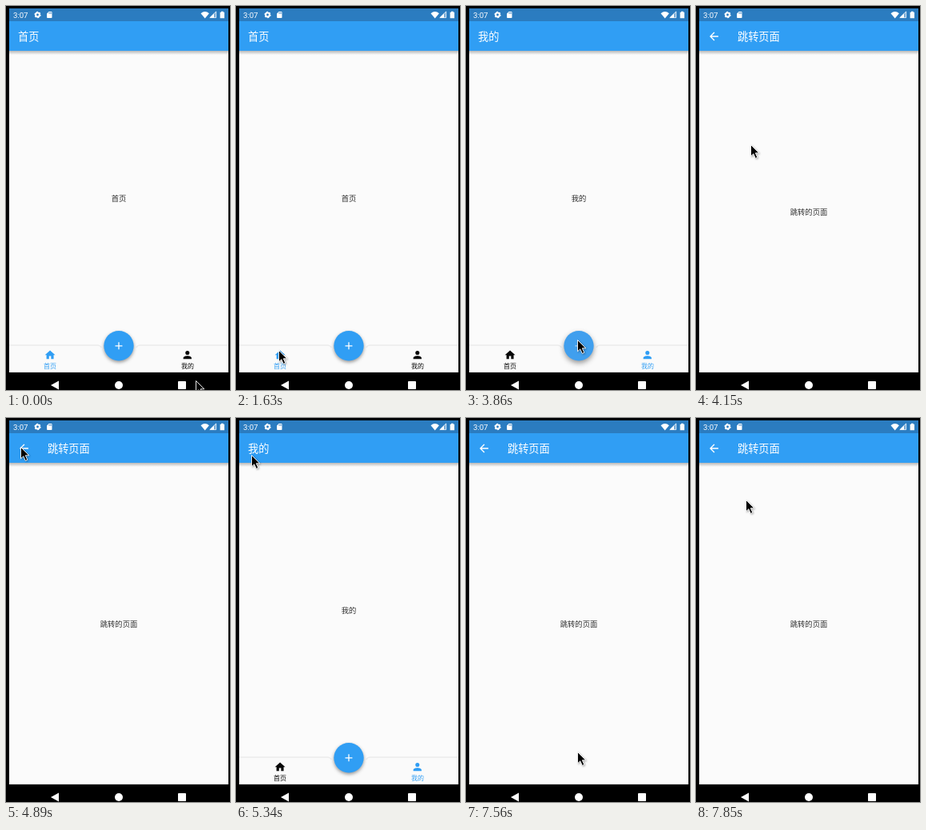
Recreate the animation shown at these times as an HTML page. Size 280 by 480 pixels, loop 8 s.

```html
<!DOCTYPE html>
<html lang="zh-CN">
<head>
<meta charset="utf-8">
<style>
  html, body { margin: 0; width: 100%; height: 100%; overflow: hidden; background: #000; }
  svg { display: block; width: 280px; height: 480px; }
  text { font-family: "Noto Sans CJK SC", "Noto Sans CJK", sans-serif; }
  .clock { font: 9.6px Roboto, sans-serif; }
  .title { font-size: 13.2px; fill: #fff; }
  .body { font-size: 9.35px; fill: #303030; text-anchor: middle; }
  .tab { fill: #080808; }
  .tab.on { fill: #309ef4; }
  .tab text { font-size: 8px; text-anchor: middle; }
  #fab circle { fill: #309ef4; filter: drop-shadow(0 2px 2px #0006); }
  #fab.pressed circle { fill: #409fee; filter: drop-shadow(0 3px 3px #0006); }
  #fab.pressed path { opacity: .6; }
</style>
</head>
<body>
<svg viewBox="0 0 280 480">
  <defs>
    <linearGradient id="shade" x2="0" y2="1">
      <stop stop-color="#000" stop-opacity=".27"/>
      <stop offset="1" stop-color="#000" stop-opacity="0"/>
    </linearGradient>
  </defs>
  <rect width="280" height="480"/>
  <rect x="4" y="3" width="274" height="455" fill="#fbfbfb"/>
  <rect x="4" y="56" width="274" height="5" fill="url(#shade)"/>
  <rect x="4" y="3" width="274" height="16" fill="#2b7cc0"/>
  <rect x="4" y="19" width="274" height="37" fill="#309ef4"/>

  <!-- status bar -->
  <g fill="#fff">
    <text class="clock" x="9" y="15">3:07</text>
    <g fill="none" stroke="#fff">
      <circle cx="39.5" cy="11" r="2.4" stroke-width="2"/>
      <circle cx="39.5" cy="11" r="3.5" stroke-width="1.3" stroke-dasharray="1.83"/>
    </g>
    <path transform="translate(49.5 6.3) scale(.4)" d="M18 2h-8L4 8v12q0 2 2 2h12q2 0 2-2V4q0-2-2-2zm-6 6h-2V4h2zm3 0h-2V4h2zm3 0h-2V4h2z"/>
    <path d="M243.5 9.2q5.2-4.4 10.4 0L248.7 15.4z"/>
    <path d="M254.8 14.6L262.6 7v7.6z" fill-opacity=".35" stroke="#fff" stroke-width=".8"/>
    <path d="M254.8 14.8L260 9.6v5.2z"/>
    <path d="M269 6.7h2.6v1h1.4v7.5h-5.4V7.7h1.4z"/>
  </g>

  <path id="back" fill="#fff" transform="translate(14.3 29.8) scale(.68)" d="M20 11H7.83l5.59-5.59L12 4l-8 8 8 8 1.41-1.41L7.83 13H20z"/>
  <text id="title" class="title" y="43"></text>
  <text id="body" class="body" x="141"></text>

  <g id="tabs">
    <path d="M4 424H114q4 0 5 3A22 22 0 0 0 163 427q1-3 5-3H278V455H4z" fill="#fafafa"/>
    <path d="M4 424H114q4 0 5 3M163 427q1-3 5-3H278" fill="none" stroke="#ececec" stroke-width="1.5"/>
    <g id="homeTab" class="tab">
      <path transform="translate(47.4 428.5) scale(.64)" d="M10 20v-6h4v6h5v-8h3L12 3 2 12h3v8z"/>
      <text x="55" y="453">首页</text>
    </g>
    <g id="mineTab" class="tab">
      <path transform="translate(219.1 428.4) scale(.64)" d="M12 12a4 4 0 1 0 0-8 4 4 0 0 0 0 8zm0 2c-2.67 0-8 1.34-8 4v2h16v-2c0-2.66-5.33-4-8-4z"/>
      <text x="227" y="453">我的</text>
    </g>
    <g id="fab">
      <circle cx="141" cy="424.8" r="18.7"/>
      <path fill="#fff" transform="translate(133.3 417.1) scale(.64)" d="M19 13h-6v6h-2v-6H5v-2h6V5h2v6h6z"/>
    </g>
  </g>

  <!-- system navigation -->
  <rect x="4" y="455" width="274" height="3" fill="#fff"/>
  <g fill="#fff">
    <path d="M56 474l10-5.5v11z"/>
    <circle cx="141" cy="474" r="5"/>
    <rect x="215" y="469" width="10" height="10" rx=".8"/>
  </g>

  <path id="cursor" d="M.5.5V14.8L3.8 11.8 6.3 17.4 8.8 16.3 6.3 10.8H10.8z" stroke="#fff" stroke-width=".9" style="filter:drop-shadow(1px 1px 1px #0005)"/>
</svg>

<script>
const LOOP = 8000, TICKS = 54;
const $ = id => document.getElementById(id);

const pages = {
  home: { title: "首页", body: "首页", x: 15, y: 244 },
  mine: { title: "我的", body: "我的", x: 15, y: 244 },
  jump: { title: "跳转页面", body: "跳转的页面", x: 52, y: 261 }
};

// [tick, page]: navigation is instant
const visits = [
  [0, "home"], [4, "mine"], [11, "home"], [18, "mine"],
  [27, "jump"], [35, "mine"], [43, "home"], [51, "jump"]
];

// [tick, x, y] of the pointer tip
const path = [
  [0, 237, 468], [2, 222, 444], [5, 222, 444], [9, 53, 430], [11, 53, 430],
  [16, 233, 441], [21, 233, 441], [26, 139, 417], [27, 139, 417],
  [28, 68, 173], [29, 63, 141], [33, 18, 36], [35, 18, 36], [36, 19, 46],
  [41, 50, 437], [44, 50, 437], [45, 153, 391], [46, 174, 400],
  [49, 139, 417], [51, 139, 417], [52, 121, 322], [53, 62, 102]
];

function pointerAt(tick) {
  const next = Math.max(1, path.findIndex(p => p[0] >= tick));
  const [t0, x0, y0] = path[next - 1], [t1, x1, y1] = path[next];
  const k = (tick - t0) / (t1 - t0);
  return [x0 + (x1 - x0) * k, y0 + (y1 - y0) * k].map(Math.round);
}

function draw(tick) {
  const name = visits.findLast(v => v[0] <= tick)[1];
  const page = pages[name];
  $("title").textContent = page.title;
  $("title").setAttribute("x", page.x);
  $("body").textContent = page.body;
  $("body").setAttribute("y", page.y);
  $("back").style.display = name === "jump" ? "" : "none";
  $("tabs").style.display = name === "jump" ? "none" : "";
  $("homeTab").classList.toggle("on", name === "home");
  $("mineTab").classList.toggle("on", name === "mine");
  $("fab").classList.toggle("pressed", tick === 26);
  $("cursor").setAttribute("transform", `translate(${pointerAt(tick)})`);
}

const start = performance.now();
function frame() {
  const time = Math.max(0, performance.now() - start) % LOOP;
  draw(Math.min(TICKS - 1, Math.floor((time + 11) * TICKS / LOOP)));
  requestAnimationFrame(frame);
}
frame();
</script>
</body>
</html>
```
